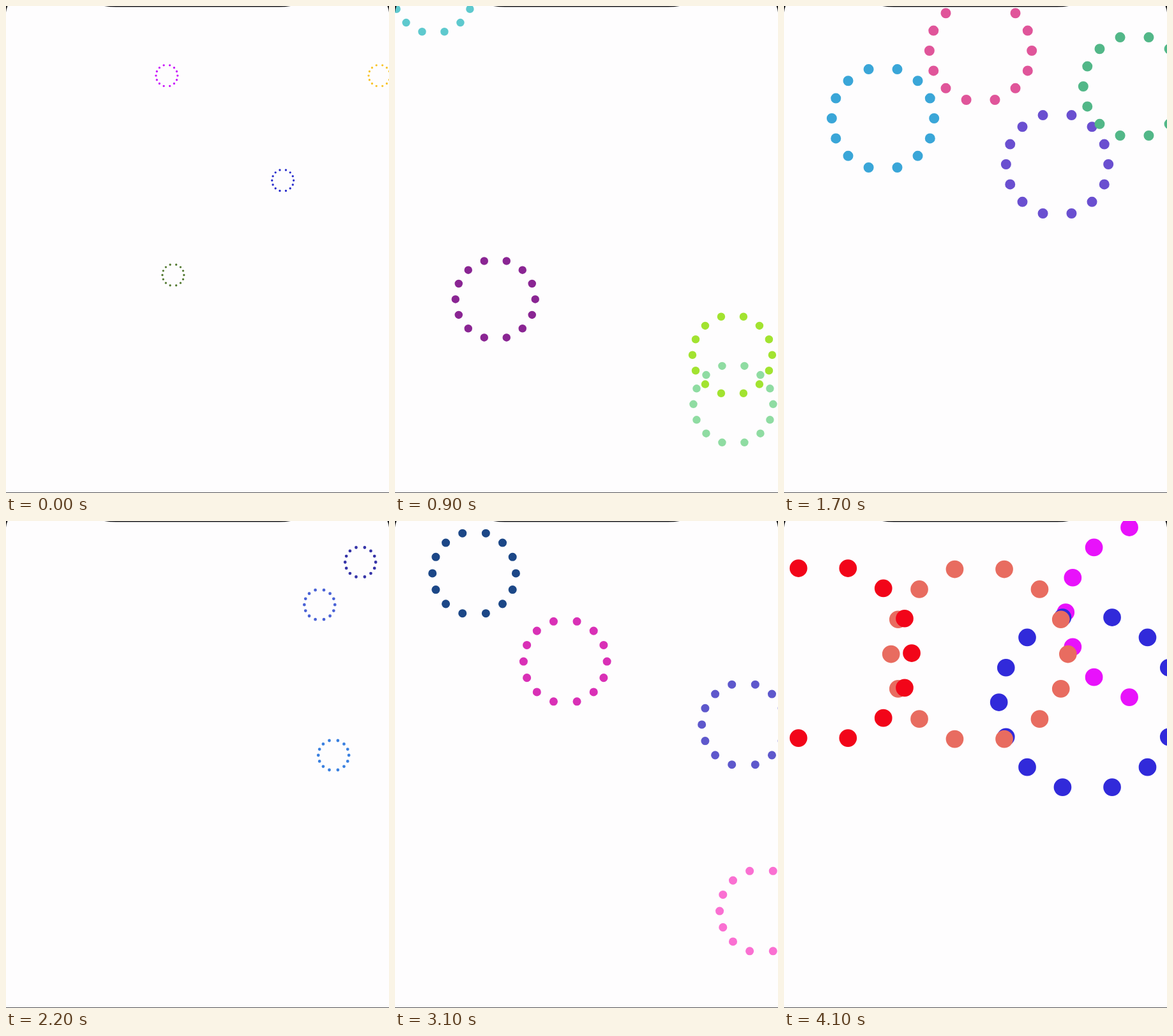
Animation of 600 by 763 pixels, one loop 4200 ms. Source, as an HTML page with a canvas:

```html
<!DOCTYPE html>
<html lang="en">
<head>
<meta charset="utf-8">
<title>Dot bursts</title>
<style>
  html, body { margin: 0; width: 100%; height: 100%; overflow: hidden; background: #fefdfe; }
  canvas { display: block; }
</style>
</head>
<body>
<canvas id="stage" width="600" height="763"></canvas>
<script>
const ctx = document.getElementById('stage').getContext('2d');
const W = 600, H = 763;
const LOOP = 4200, STEP = 100, LIFE = 715, GROW = 1000, SPREAD = 174;

// Each ring: x, y, colour, in paint order.
const bursts = [
  { start: -202, rings: [
    [250.2, 107.4, '#c814fb'], [583.3, 107.4, '#f8c42c'],
    [260.2, 419.8, '#547a32'], [432, 271.6, '#282ccc']] },
  { start: 491, rings: [
    [53.7, -26, '#5ec9ce'], [151, 453.2, '#8a2593'],
    [522.2, 540.5, '#a2e330'], [523.7, 617.6, '#8fdca2']] },
  { start: 1225, rings: [
    [147, 168, '#3aa6d8'], [300, 62, '#e0559a'],
    [420, 240, '#6a4fd0'], [541, 118, '#52b788']] },
  { start: 1958, rings: [
    [182, -45, '#3f72d8'], [552.8, 62.1, '#3634a8'],
    [488.9, 128.8, '#4a62d6'], [510.8, 364.6, '#3a80e0']] },
  { start: 2680, rings: [
    [117.5, 75.4, '#1c4787'], [260.2, 213.5, '#d930b6'],
    [539.5, 312.4, '#5e58cc'], [567.4, 604.5, '#fa70d2']] },
  { start: 3398, rings: [
    [566, 129.2, '#e812fb'], [461.4, 270.2, '#312ada'],
    [292.4, 194.7, '#e86c60'], [47.6, 193.2, '#f20519']] }
];

// Fourteen unit directions, mirrored left and right.
const spokes = [];
for (let k = -3; k <= 3; k++) {
  const a = 2 * Math.asin(k / 5);
  spokes.push([Math.cos(a), Math.sin(a)], [-Math.cos(a), Math.sin(a)]);
}

function drawRing([x, y, color], radius) {
  const dot = radius / 10;
  ctx.fillStyle = color;
  ctx.beginPath();
  for (const [dx, dy] of spokes) {
    // Dots grow from their top-left corner, so the ring drifts by one dot radius.
    const px = x + dot + dx * radius, py = y + dot + dy * radius;
    ctx.moveTo(px + dot, py);
    ctx.arc(px, py, dot, 0, Math.PI * 2);
  }
  ctx.fill();
}

const bezel = new Path2D(
  'M154 0Q162 1.5 172 1.5H428Q438 1.5 446 0Z' +
  'M0 0H2.5Q.8 4 0 10Z M600 0H597.5Q599.2 4 600 10Z');

function draw(t) {
  ctx.fillStyle = '#fefdfe';
  ctx.fillRect(0, 0, W, H);
  for (const { start, rings } of bursts) {
    const age = t - start;
    if (age <= 0 || age > LIFE) continue;
    const radius = SPREAD * (1 - Math.cos(Math.PI * age / GROW)) / 2;
    for (const ring of rings) drawRing(ring, radius);
  }
  ctx.fillStyle = '#1c1c1e';
  ctx.fill(bezel);
  ctx.fillStyle = '#555557';
  ctx.fillRect(0, H - 1, W, 1);
}

const origin = performance.now();
function tick() {
  const t = (performance.now() - origin) % LOOP;
  draw(Math.floor(t / STEP) * STEP);
  requestAnimationFrame(tick);
}
tick();
</script>
</body>
</html>
```
